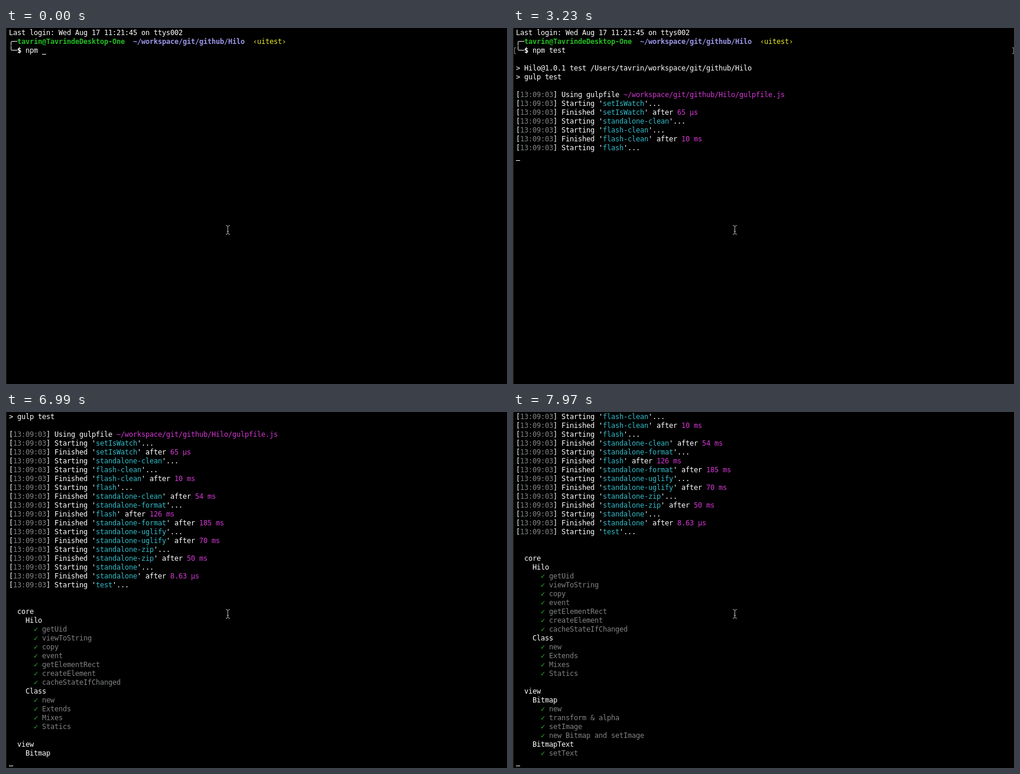
Recreate the animation shown at these times as an HTML page. Size 848 by 603 pixels, loop 8000 ms.

```html
<!DOCTYPE html>
<html lang="en">
<head>
<meta charset="utf-8">
<title>Terminal test run</title>
<style>
  html, body { margin: 0; width: 100%; height: 100%; overflow: hidden; background: #000; }
  #stage { position: relative; width: 848px; height: 603px; overflow: hidden; background: #000; }
  #stage > * { position: absolute; }
  #edge { left: 0; top: 0; width: 1px; height: 603px; background: #262626; }
  #screen {
    left: 5px; top: 1px; color: #fff; white-space: pre;
    font: 12px/15px "DejaVu Sans Mono", monospace;
    letter-spacing: calc(7px - 1ch); /* terminal cell is 7 by 15 */
  }
  #screen div { height: 15px; }
  #cursor { width: 7px; height: 1px; background: #fff; }
  .mark { top: 33px; width: 2px; height: 9px; border: 1px solid #8a8a8a; }
  #left { left: 2px; border-right: 0; }
  #right { left: 845px; border-left: 0; }
  svg { left: 371px; top: 333px; fill: none; stroke: #b4b4b4; }
  b { font-weight: bold; }
  .green { color: #25bc24; }
  .blue { color: #9a96e6; }
  .yellow { color: #eaec23; }
  .cyan { color: #33bbc8; }
  .pink { color: #d338d3; }
  .gray { color: #818383; }
</style>
</head>
<body>
<div id="stage">
  <div id="edge"></div>
  <div id="screen"></div>
  <div id="left" class="mark"></div>
  <div id="right" class="mark"></div>
  <div id="cursor"></div>
  <svg width="9" height="18"><path d="M1 1.5Q4.5 1.5 4.5 4V14Q4.5 16.5 1 16.5M8 1.5Q4.5 1.5 4.5 4M8 16.5Q4.5 16.5 4.5 14M3 11.5H6"/></svg>
</div>
<script>
const LOOP = 8000, ROWS = 40, PROMPT = 2;
const $ = id => document.getElementById(id);
const paint = (color, text) => `<span class="${color}">${text}</span>`;
const log = text => `[${paint('gray', '13:09:03')}] ${text}`;
const start = task => log(`Starting '${paint('cyan', task)}'...`);
const finish = (task, time) => log(`Finished '${paint('cyan', task)}' after ${paint('pink', time)}`);
const suite = (name, ...tests) => [
  '    ' + name,
  ...tests.map(test => `      ${paint('green', '✓')} ${paint('gray', test)}`)
];

const lines = [
  'Last login: Wed Aug 17 11:21:45 on ttys002',
  `╭─<b>${paint('green', 'tavrin@TavrindeDesktop-One')}  ${paint('blue', '~/workspace/git/github/Hilo')}</b>  ${paint('yellow', '‹uitest›')}`,
  '╰─<b>$</b> npm ',
  '',
  '&gt; Hilo@1.0.1 test /Users/tavrin/workspace/git/github/Hilo',
  '&gt; gulp test',
  '',
  log('Using gulpfile ' + paint('pink', '~/workspace/git/github/Hilo/gulpfile.js')),
  start('setIsWatch'),
  finish('setIsWatch', '65 µs'),
  start('standalone-clean'),
  start('flash-clean'),
  finish('flash-clean', '10 ms'),
  start('flash'),
  finish('standalone-clean', '54 ms'),
  start('standalone-format'),
  finish('flash', '126 ms'),
  finish('standalone-format', '185 ms'),
  start('standalone-uglify'),
  finish('standalone-uglify', '70 ms'),
  start('standalone-zip'),
  finish('standalone-zip', '50 ms'),
  start('standalone'),
  finish('standalone', '8.63 µs'),
  start('test'),
  '',
  '',
  '  core',
  ...suite('Hilo', 'getUid', 'viewToString', 'copy', 'event', 'getElementRect', 'createElement', 'cacheStateIfChanged'),
  ...suite('Class', 'new', 'Extends', 'Mixes', 'Statics'),
  '',
  '  view',
  ...suite('Bitmap', 'new', 'transform &amp; alpha', 'setImage', 'new Bitmap and setImage'),
  ...suite('BitmapText', 'setText')
];

// [time, letters typed], then [time, line the cursor is on]
const typing = [[0, 0], [290, 1], [410, 2], [580, 3], [640, 4]];
const output = [
  [0, PROMPT], [1330, 3], [1860, 7],
  [3230, 14], [3290, 16], [3350, 17], [3470, 19], [3530, 21], [3580, 25],
  [6940, 42], [6990, 44], [7290, 45], [7490, 46], [7700, 47], [7970, 50]
];
const valueAt = (steps, t) => steps.filter(step => step[0] <= t).pop()[1];

let shown = '';
function draw() {
  const t = performance.now() % LOOP;
  const typed = valueAt(typing, t), line = valueAt(output, t);
  const state = typed + '/' + line;
  if (state !== shown) {
    shown = state;
    const top = Math.max(0, line - ROWS + 1);
    const count = Math.max(line, PROMPT + 1);
    $('screen').innerHTML = lines.slice(0, count)
      .map((text, i) => `<div>${i === PROMPT ? text + 'test'.slice(0, typed) : text}</div>`)
      .slice(top).join('');
    const column = line === PROMPT ? 8 + typed : 0;
    $('cursor').style.left = 5 + 7 * column + 'px';
    $('cursor').style.top = 15 * (line - top) + 14 + 'px';
    const marked = line > PROMPT && top === 0;
    for (const id of ['left', 'right']) $(id).style.display = marked ? '' : 'none';
  }
  requestAnimationFrame(draw);
}
draw();
</script>
</body>
</html>
```
